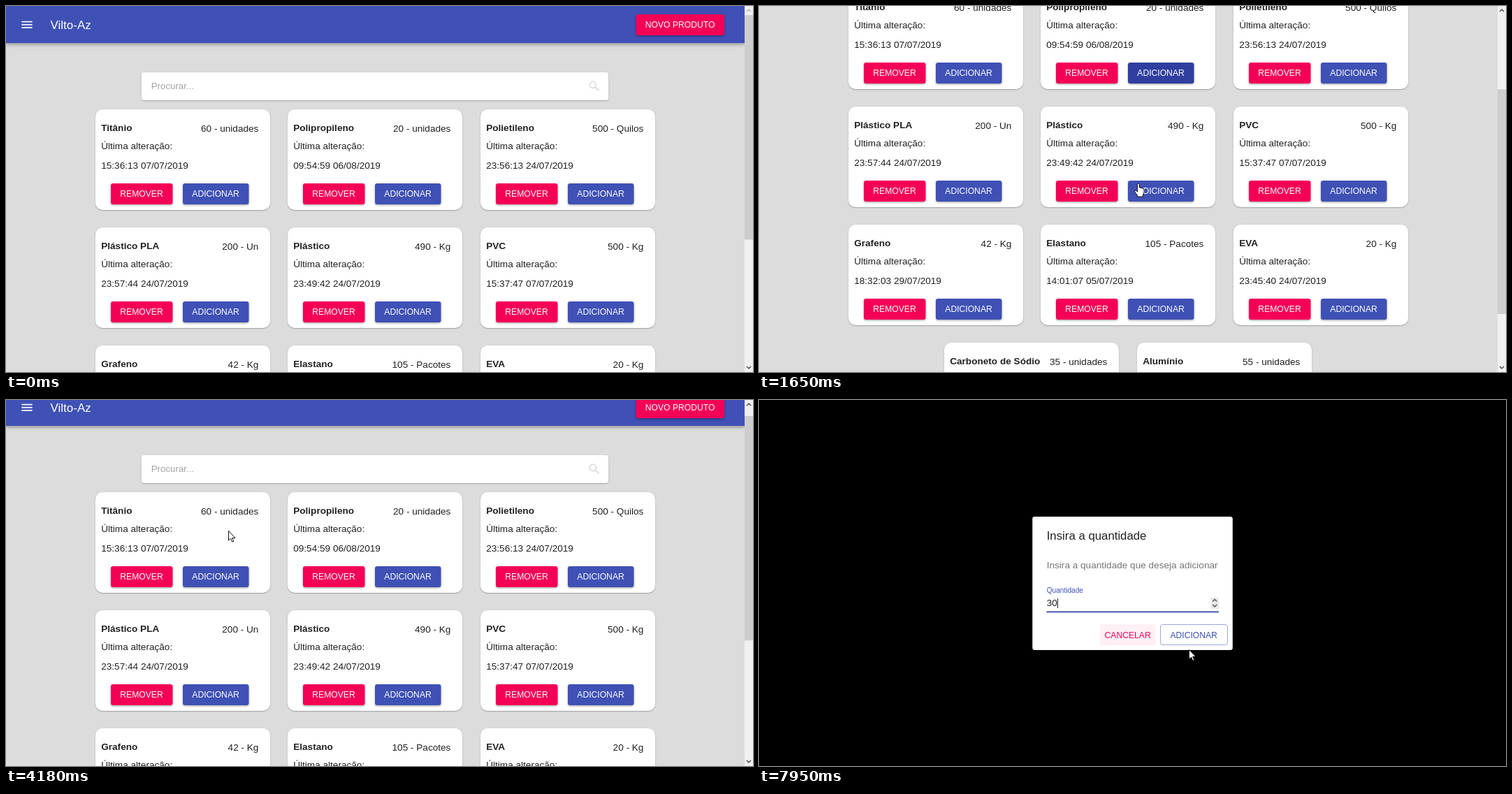
Animation of 1069 by 524 pixels, one loop 8 s. Source, as an HTML page with a canvas:

```html
<!DOCTYPE html>
<html lang="pt">
<head>
<meta charset="utf-8">
<title>Estoque</title>
<style>
html, body { margin: 0; width: 100%; height: 100%; overflow: hidden; background: #dcdcdc; }
canvas { display: block; }
</style>
</head>
<body>
<canvas id="stage" width="1069" height="524"></canvas>
<script>
const ctx = document.getElementById('stage').getContext('2d');
const W = 1069, H = 524, LOOP = 8000, PAGE_W = 1057, MAX_SCROLL = 288;
const BLUE = '#3f51b5', PINK = '#f50057', INK = 'rgba(0,0,0,0.87)';
const FONT = '"Liberation Sans", Arial, sans-serif';

const cards = [
  ['Titânio', '60 - unidades', '15:36:13 07/07/2019'],
  ['Polipropileno', '20 - unidades', '09:54:59 06/08/2019'],
  ['Polietileno', '500 - Quilos', '23:56:13 24/07/2019'],
  ['Plástico PLA', '200 - Un', '23:57:44 24/07/2019'],
  ['Plástico', '490 - Kg', '23:49:42 24/07/2019'],
  ['PVC', '500 - Kg', '15:37:47 07/07/2019'],
  ['Grafeno', '42 - Kg', '18:32:03 29/07/2019'],
  ['Elastano', '105 - Pacotes', '14:01:07 05/07/2019'],
  ['EVA', '20 - Kg', '23:45:40 24/07/2019'],
  ['Carboneto de Sódio', '35 - unidades', '14:01:14 05/07/2019'],
  ['Alumínio', '55 - unidades', '14:01:18 05/07/2019']
];

// Eased pointer moves, each from where the previous one ended
const moves = [
  { from: 420, to: 960, x: 543, y: 254 },
  { from: 2870, to: 3600, x: 290, y: 308 },
  { from: 3710, to: 4000, x: 318, y: 187 },
  { from: 4460, to: 5250, x: 320, y: 262 },
  { from: 5760, to: 6600, x: 467, y: 280 },
  { from: 7660, to: 7950, x: 615, y: 357 }
];

// Hover interval by card index
const hovers = { 0: [5000, LOOP], 1: [900, 1940], 6: [3480, 3760] };

const during = (t, a, b) => t >= a && t < b;
const progress = (t, a, b) => Math.max(0, Math.min(1, (t - a) / (b - a)));
const smooth = u => u * u * (3 - 2 * u);
const hoverAmount = (t, [on, off]) => progress(t, on, on + 250) - progress(t, off, off + 250);

function scrollAt(t) {
  if (t < 1140) return 0;
  const down = progress(t, 1050, 1940) ** 1.3;
  const remaining = (1 - progress(t, 3725, 4320)) ** 2;
  return Math.round(MAX_SCROLL * down * remaining);
}

function pointerAt(t) {
  let x = 898, y = 474;
  for (const move of moves) {
    const u = smooth(progress(t, move.from, move.to));
    x += (move.x - x) * u;
    y += (move.y - y) * u;
  }
  return [x, y];
}

function rect(x, y, w, h, fill) {
  ctx.fillStyle = fill;
  ctx.fillRect(x, y, w, h);
}

function rounded(x, y, w, h, r) {
  ctx.beginPath();
  ctx.roundRect(x, y, w, h, r);
}

// Casts a shadow alone: the casting shape itself lies outside the stage
function castShadow(x, y, w, h, r, dy, blur, alpha) {
  const away = 3000;
  ctx.save();
  ctx.shadowColor = `rgba(0,0,0,${alpha})`;
  ctx.shadowBlur = blur;
  ctx.shadowOffsetX = away;
  ctx.shadowOffsetY = dy;
  ctx.fillStyle = '#000';
  rounded(x - away, y, w, h, r);
  ctx.fill();
  ctx.restore();
}

function panel(x, y, w, h, r, fill, level = 0) {
  if (level) {
    castShadow(x, y, w, h, r, 0.8 * level, 0.9 * level, 0.2);
    castShadow(x, y, w, h, r, 0.8, 2 * level + 0.5, 0.16);
  }
  ctx.fillStyle = fill;
  rounded(x, y, w, h, r);
  ctx.fill();
}

function text(str, x, y, { size = 13.6, color = INK, bold = false, align = 'left' } = {}) {
  ctx.font = `${bold ? 'bold ' : ''}${size}px ${FONT}`;
  ctx.textAlign = align;
  ctx.fillStyle = color;
  ctx.fillText(str, x, y);
}

const label = (str, x, y, color = '#fff') => text(str, x, y, { size: 12.15, color });

function line(points, color, width) {
  ctx.beginPath();
  points.forEach(([x, y]) => ctx.lineTo(x, y));
  ctx.strokeStyle = color;
  ctx.lineWidth = width;
  ctx.stroke();
}

function chevron(x, y, dir, color) {
  line([[x - 3, y + dir * 1.5], [x, y - dir * 1.5], [x + 3, y + dir * 1.5]], color, 1.5);
}

function button(str, x, y, w, fill, level = 2) {
  panel(x, y, w, 30, 3.3, fill, level);
  label(str, x + 13.3, y + 19);
}

function drawRipple(x, y, w, h, t) {
  ctx.save();
  rounded(x, y, w, h, 3.3);
  ctx.clip();
  ctx.beginPath();
  ctx.arc(320, 262, 83 * (1 - (1 - progress(t, 5360, 5910)) ** 2), 0, 7);
  ctx.fillStyle = 'rgba(255,255,255,0.3)';
  ctx.fill();
  ctx.restore();
}

function addButton(x, y, index, t) {
  const amount = hovers[index] ? hoverAmount(t, hovers[index]) : 0;
  const fill = `rgb(${63 - 15 * amount},${81 - 18 * amount},${181 - 22 * amount})`;
  const pressed = index === 0 && t >= 5360;
  button('ADICIONAR', x, y, 94.5, fill, pressed ? 4 : 2);
  if (pressed) {
    drawRipple(x, y, 94.5, 30, t);
    label('ADICIONAR', x + 13.3, y + 19);
  }
}

function drawCard([name, amount, date], index, t) {
  const row = Math.floor(index / 3), col = index % 3 + (row === 3 ? 0.5 : 0);
  const x = Math.round(127.7 + 275.4 * col), y = 148 + 169 * row;
  panel(x, y, 250, 144, 10, '#fff', 1);
  text(name, x + 8.2, y + 31, { bold: true });
  text(amount, x + 233.4, y + 32, { align: 'right' });
  text('Última alteração:', x + 8.2, y + 57);
  text(date, x + 8.2, y + 85);
  button('REMOVER', x + 22, y + 106, 88.5, PINK);
  addButton(x + 125, y + 106, index, t);
}

function drawPage(t, scroll) {
  rect(0, 0, W, H, '#dcdcdc');
  ctx.save();
  ctx.translate(0, -scroll);
  panel(0, 0, PAGE_W, 53, 0, BLUE, 4);
  for (let i = 0; i < 3; i++) rect(22.3, 21.7 + 4.2 * i, 15.4, 1.7, '#fff');
  text('Vilto-Az', 63.5, 33, { size: 17, color: '#fff' });
  button('NOVO PRODUTO', 901.5, 12, 126.5, PINK);

  panel(194, 95, 668, 40, 3.3, '#fff', 1);
  text('Procurar...', 207.7, 119, { size: 13.3, color: '#a3a3a3' });
  ctx.beginPath();
  ctx.arc(839.8, 112.8, 4.6, 0, 7);
  ctx.strokeStyle = '#dcdcdc';
  ctx.lineWidth = 1.7;
  ctx.stroke();
  line([[843.2, 116.2], [848.3, 121.3]], '#dcdcdc', 2);

  cards.forEach((card, i) => drawCard(card, i, t));
  ctx.restore();
}

function drawScrollbar(scroll) {
  const w = W - PAGE_W, mid = PAGE_W + w / 2;
  const arrowColor = enabled => enabled ? '#505050' : '#b5b5b5';
  rect(PAGE_W, 0, w, H, '#f0f0f0');
  rect(PAGE_W, 13 + scroll * 0.615, w, 321.5, '#cdcdcd');
  chevron(mid, 6.5, 1, arrowColor(scroll > 0));
  chevron(mid, 517.5, -1, arrowColor(scroll < MAX_SCROLL));
}

function drawDialog(t) {
  const alpha = progress(t, 5740, 6040);
  if (!alpha) return;
  ctx.save();
  ctx.globalAlpha = alpha;
  rect(0, 0, W, H, '#000');
  panel(391.3, 167, 286.5, 191, 3.3, '#fff');
  text('Insira a quantidade', 411.7, 199.5, { size: 16.8 });
  text('Insira a quantidade que deseja adicionar', 411.7, 241, { color: 'rgba(0,0,0,0.54)' });
  text('Quantidade', 411.7, 276, { size: 10.1, color: BLUE });

  const value = '30'.slice(0, (t >= 7340) + (t >= 7570));
  text(value, 411.7, 295);
  rect(412 + Math.round(7.5 * value.length), 284, 1, 14, '#222');
  rect(411.5, 302.5, 246.5, 1.7, '#303f9f');
  rect(646.5, 283, 11.5, 16, '#e8e8e8');
  chevron(652.2, 287, 1, '#555');
  chevron(652.2, 294.5, -1, '#555');

  const tint = 0.08 * hoverAmount(t, [7750, 7930]);
  panel(488, 321.3, 79.6, 30, 3.3, `rgba(245,0,87,${tint})`);
  label('CANCELAR', 494.6, 340.5, PINK);
  rounded(574.5, 321.5, 96, 29, 3.3);
  ctx.strokeStyle = 'rgba(63,81,181,0.5)';
  ctx.lineWidth = 1;
  ctx.stroke();
  label('ADICIONAR', 588.4, 340.5, BLUE);
  ctx.restore();
}

const arrowShape = new Path2D('M.5 .5V14L3.6 11.2 5.7 16.2 7.8 15.3 5.7 10.5H10Z');
const handShape = new Path2D('M-1.5 1.2Q0-1 1.5 1.2V6L4 6.4 6.3 7.2 8 8.8V13L6.5 16V19H-1.6V17L-5.3 11.8Q-5.4 9.6-3.4 10.2L-1.5 12Z');

function drawPointer(t) {
  const hidden = t < 420 || during(t, 1940, 2090) || during(t, 7060, 7710);
  if (hidden) return;
  const hand = Object.values(hovers).some(([on, off]) => during(t, on, Math.min(off, 5690)));
  const shape = hand ? handShape : arrowShape;
  ctx.save();
  ctx.translate(...pointerAt(t));
  ctx.fillStyle = '#fff';
  ctx.strokeStyle = '#111';
  ctx.lineWidth = 1;
  ctx.lineJoin = 'round';
  ctx.fill(shape);
  ctx.stroke(shape);
  ctx.restore();
}

function draw(now) {
  const t = now % LOOP, scroll = scrollAt(t);
  drawPage(t, scroll);
  if (t < 5690) drawScrollbar(scroll);
  drawDialog(t);
  drawPointer(t);
}

const start = performance.now();
function tick() {
  draw(performance.now() - start);
  requestAnimationFrame(tick);
}
tick();
</script>
</body>
</html>
```
